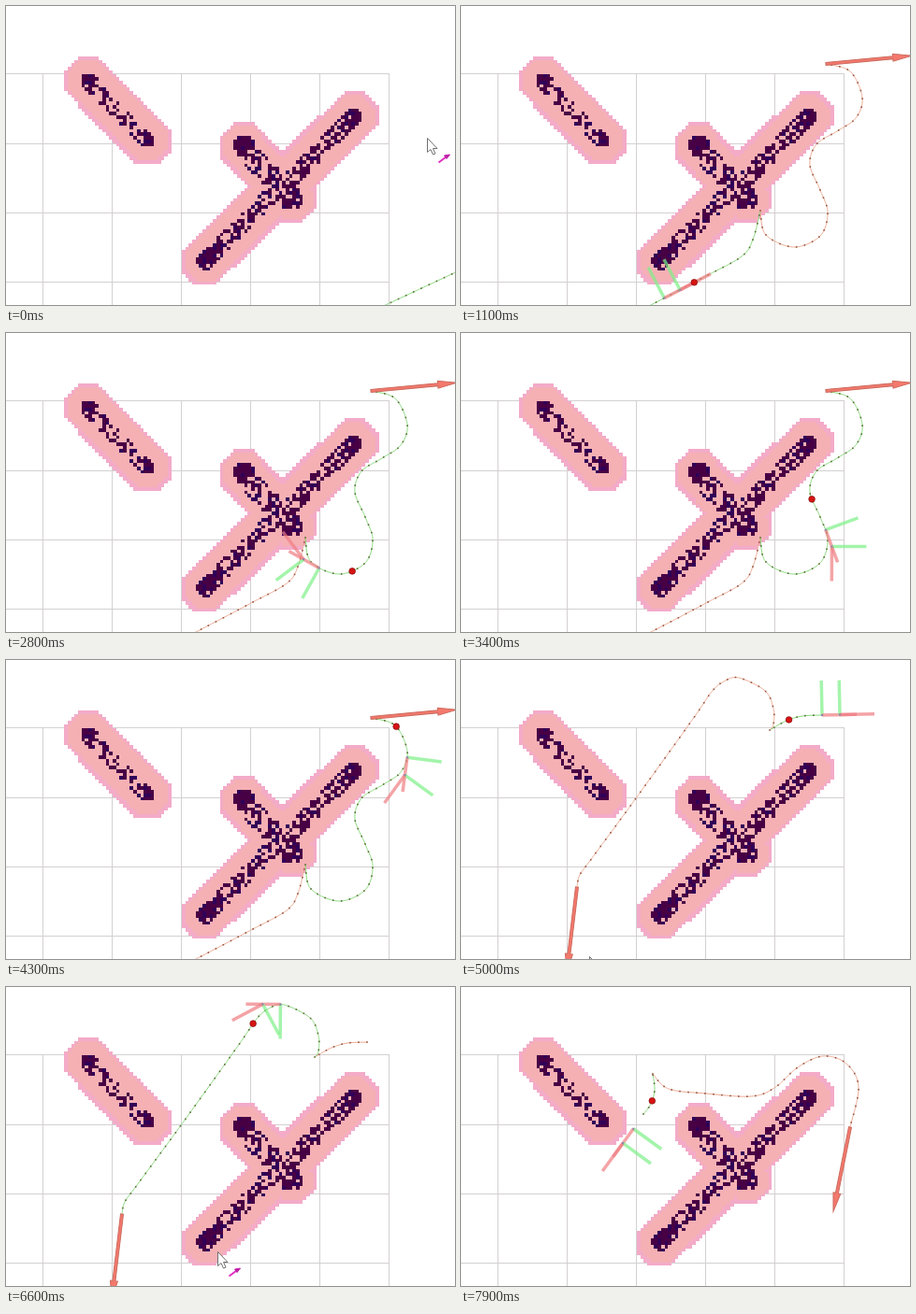
An HTML page with a canvas that plays this animation: 480x320 px, repeating every 8000 ms.

```html
<!DOCTYPE html>
<html>
<head>
<meta charset="utf-8">
<style>
html, body { margin: 0; width: 100%; height: 100%; overflow: hidden; background: #fff; }
canvas { display: block; }
</style>
</head>
<body>
<canvas id="stage" width="480" height="320"></canvas>
<script>
const LOOP = 8000, STEP = 100, CELL = 3.7, WHEELBASE = 19, AXIS = 37, LOOKAHEAD = 35, RAMP = 600;
const stage = document.getElementById('stage');
const c = stage.getContext('2d');
const clamp = (v, a, b) => Math.min(b, Math.max(a, v));
const mix = (a, b, k) => a + (b - a) * k;
const distance = (a, b) => Math.hypot(a[0] - b[0], a[1] - b[1]);

// Catmull-Rom curve resampled to one point per pixel of length
function curve(p) {
  const out = [p[0]];
  let last = p[0], need = 1;
  for (let i = 0; i < p.length - 1; i++) {
    const a = p[i - 1] || p[i], b = p[i], d = p[i + 1], e = p[i + 2] || d;
    for (let u = 0; u <= 1; u += .005) {
      const q = [0, 1].map(j => b[j] + u / 2 * (d[j] - a[j] +
        u * (2 * a[j] - 5 * b[j] + 4 * d[j] - e[j] + u * (3 * (b[j] - d[j]) + e[j] - a[j]))));
      need -= distance(q, last);
      if (need <= 0) { out.push(q); need += 1; }
      last = q;
    }
  }
  return out;
}

// One stretch of a plan, driven from start to end; dir -1 means reversing
const leg = (start, end, dir, ...points) => ({ start, end, dir, path: curve(points) });

const plans = [
  { from: 0, legs: [leg(0, LOOP, 1, [395, 325], [440, 304], [485, 283])] },
  {
    from: 800, goal: [390, 62, -.095],
    legs: [
      leg(100, 2350, 1, [120, 362], [203, 320], [262, 289], [300, 268], [312, 250], [320, 219]),
      leg(2250, 5030, -1, [320, 219], [326, 245], [356, 258], [384, 246], [392, 221], [384, 197],
        [373, 170], [380, 148], [402, 134], [422, 120], [429, 98], [416, 70], [390, 62])
    ]
  },
  {
    from: 5000, goal: [124, 243, 1.69],
    legs: [
      leg(5000, 5700, -1, [386, 59], [365, 60], [348, 65], [330, 75]),
      leg(5700, 9020, 1, [330, 75], [334, 69], [334, 52], [325, 33], [297, 19], [281, 23],
        [268, 34], [248, 63], [187, 148], [140, 212], [127, 230], [124, 243])
    ]
  },
  {
    from: 7700, goal: [416, 150, 1.768],
    legs: [
      leg(LOOP, LOOP, -1, [195, 136], [203, 125], [207, 110], [205, 93]),
      leg(LOOP, LOOP, 1, [205, 93], [222, 109], [262, 114], [310, 117], [335, 108], [360, 86],
        [387, 74], [412, 82], [425, 107], [416, 150])
    ]
  }
];
const drives = plans.slice(1).flatMap(p => p.legs);

const drag = ({ from, goal: [x, y, a] }) =>
  [[from - 400, x, y], [from - 100, x + 90 * Math.cos(a), y + 90 * Math.sin(a)]];
const pointer = [
  [0, 450, 141], [100, 450, 141], ...drag(plans[1]), ...drag(plans[2]),
  [5600, 281, 228], [5700, 281, 228], [6050, 480, -5], [6500, 226, 283], [6600, 226, 283],
  ...drag(plans[3])
];

// Inflated walls: x1, y1, x2, y2, half width of the dark core
const walls = [[88, 80, 151, 144, 8], [213, 273, 372, 118, 9], [254, 151, 305, 206, 12]];

// Constant speed with equal ramps at both ends
function travelled({ start, end, path }, t) {
  const span = end - start, ramp = Math.min(RAMP, span / 2);
  const speed = (path.length - 1) / (span - ramp);
  const x = clamp(t - start, 0, span), left = span - x;
  if (x < ramp) return speed * x * x / ramp / 2;
  if (left < ramp) return path.length - 1 - speed * left * left / ramp / 2;
  return speed * (x - ramp / 2);
}

const point = (path, s) => path[clamp(Math.round(s), 0, path.length - 1)];

function angle(path, s) {
  s = clamp(s, 0, path.length - 1);
  const a = point(path, s - 4), b = point(path, s + 4);
  return Math.atan2(b[1] - a[1], b[0] - a[0]);
}

function line(x1, y1, x2, y2, color, width) {
  c.strokeStyle = color;
  c.lineWidth = width;
  c.beginPath();
  c.moveTo(x1, y1);
  c.lineTo(x2, y2);
  c.stroke();
}

function polygon(points, fill, stroke) {
  c.beginPath();
  points.forEach(p => c.lineTo(...p));
  c.closePath();
  c.fillStyle = fill;
  c.fill();
  c.strokeStyle = stroke;
  c.lineWidth = 1;
  c.stroke();
}

function disc(x, y, r, fill, stroke) {
  c.beginPath();
  c.arc(x, y, r, 0, 7);
  c.fillStyle = fill;
  c.fill();
  c.strokeStyle = stroke;
  c.lineWidth = .8;
  c.stroke();
}

// Nearest place on a wall: k along it, round and octagonal distance
function nearest(x, y, [x1, y1, x2, y2]) {
  const w = x2 - x1, h = y2 - y1;
  const k = clamp(((x - x1) * w + (y - y1) * h) / (w * w + h * h), 0, 1);
  const dx = Math.abs(x - x1 - k * w), dy = Math.abs(y - y1 - k * h);
  return { k, round: Math.hypot(dx, dy), octagon: Math.max(dx, dy, (dx + dy) * Math.SQRT1_2) };
}

function drawMap() {
  c.fillStyle = '#fff';
  c.fillRect(0, 0, 480, 320);
  for (let x = 39.5; x < 410; x += 74) line(x, 72, x, 320, '#d4d0d2', 1);
  for (const y of [72.5, 147.5, 221.5, 295.5]) line(0, y, 410, y, '#d4d0d2', 1);
  let seed = 11;
  const random = () => (seed = seed * 16807 % 2147483647) / 2147483647;
  const left = i => Math.round(i * CELL - .8), top = i => Math.round(i * CELL + 72.5);
  for (let row = -6; row < 64; row++) {
    for (let col = 14; col < 110; col++) {
      const x = (col + .5) * CELL - .8, y = (row + .5) * CELL + 72.5;
      const spots = walls.map(w => nearest(x, y, w));
      const rim = Math.min(...spots.map(p => p.octagon));
      if (rim > 26) continue;
      const density = Math.max(...spots.map((p, i) =>
        p.round < walls[i][4] ? .45 + .5 * (2 * p.k - 1) ** 4 : 0));
      const dark = random() < density;
      c.fillStyle = dark ? (random() < .75 ? '#480044' : '#300058') : rim > 22 ? '#f3abc8' : '#f5b0b4';
      c.fillRect(left(col), top(row), left(col + 1) - left(col), top(row + 1) - top(row));
    }
  }
}

function drawPlan(legs, active) {
  for (const item of legs) {
    const on = item === active;
    c.beginPath();
    item.path.forEach(p => c.lineTo(...p));
    c.strokeStyle = on ? '#84d878' : '#eaa890';
    c.lineWidth = 1;
    c.stroke();
    c.fillStyle = on ? '#5c6c34' : '#985440';
    for (let s = 0; s < item.path.length; s += 9) {
      const [x, y] = item.path[s];
      c.fillRect(x - .8, y - .8, 1.6, 1.6);
    }
  }
}

function drawGoal([x, y, heading]) {
  c.save();
  c.translate(x, y);
  c.rotate(heading);
  polygon([[0, -1.5], [72, -1.5], [72, -4], [92, 0], [72, 4], [72, 1.5], [0, 1.5]], '#f4786c', '#cc6c60');
  c.restore();
}

function drawAxes(x, y, a) {
  const dx = Math.cos(a) * AXIS, dy = Math.sin(a) * AXIS;
  line(x, y, x + dy, y - dx, 'rgba(125,240,135,.7)', 3.5);
  line(x, y, x + dx, y + dy, 'rgba(240,125,130,.7)', 3.5);
  c.fillStyle = '#8888b0';
  c.fillRect(x - 1, y - 1, 2, 2);
}

function drawRobot(t, drive, active) {
  const { path, dir } = drive, s = travelled(drive, t);
  const rear = point(path, s), [x, y] = rear;
  const heading = angle(path, s) + (dir < 0 ? Math.PI : 0);
  const bend = angle(path, s + 8) - angle(path, s - 8);
  const steer = Math.atan2(Math.sin(bend), Math.cos(bend)) * dir * WHEELBASE / 16;
  drawAxes(x, y, heading);
  drawAxes(x + Math.cos(heading) * WHEELBASE, y + Math.sin(heading) * WHEELBASE,
    heading + clamp(steer, -.5, .5));
  const ahead = active === drive ? path.slice(Math.round(s)) : active.path;
  const target = ahead.find(p => distance(p, rear) >= LOOKAHEAD) || active.path[active.path.length - 1];
  disc(...target, 3.3, '#d81414', '#8c1010');
}

function drawPointer(t) {
  if (t >= 700 && t < 4600 || t >= 7600) return;
  const i = clamp(pointer.findIndex(p => p[0] > t), 1, pointer.length - 1);
  const a = pointer[i - 1], b = pointer[i], k = (t - a[0]) / (b[0] - a[0]);
  c.save();
  c.translate(Math.round(mix(a[1], b[1], k)) + .5, Math.round(mix(a[2], b[2], k)) + .5);
  polygon([[0, 0], [0, 15], [3.5, 12], [6, 17.5], [8.5, 16.5], [6, 11], [10.5, 11]], '#fff', '#707070');
  if (t >= 4900 && t < 6050) {
    disc(18, 22, 5.5, '#fff', '#909090');
    disc(18, 22, 2.5, '#fff', '#909090');
  } else {
    line(12, 26, 20, 20, '#e030c0', 2);
    polygon([[18, 18.5], [24, 17.5], [20.5, 22]], '#c020a8', '#c020a8');
  }
  c.restore();
}

drawMap();
const map = document.createElement('canvas');
map.width = 480;
map.height = 320;
map.getContext('2d').drawImage(stage, 0, 0);

function frame() {
  const t = Math.floor(performance.now() % LOOP / STEP) * STEP;
  const { legs } = plans.filter(p => t >= p.from).pop();
  const goal = plans.filter(p => p.goal && t >= p.from - 100).pop();
  const active = legs.filter(l => t >= l.start).pop() || legs[0];
  c.drawImage(map, 0, 0);
  drawPlan(legs, active);
  if (goal) drawGoal(goal.goal);
  if (t >= plans[1].from) drawRobot(t, drives.filter(d => t >= d.start).pop(), active);
  drawPointer(t);
  requestAnimationFrame(frame);
}
frame();
</script>
</body>
</html>
```
